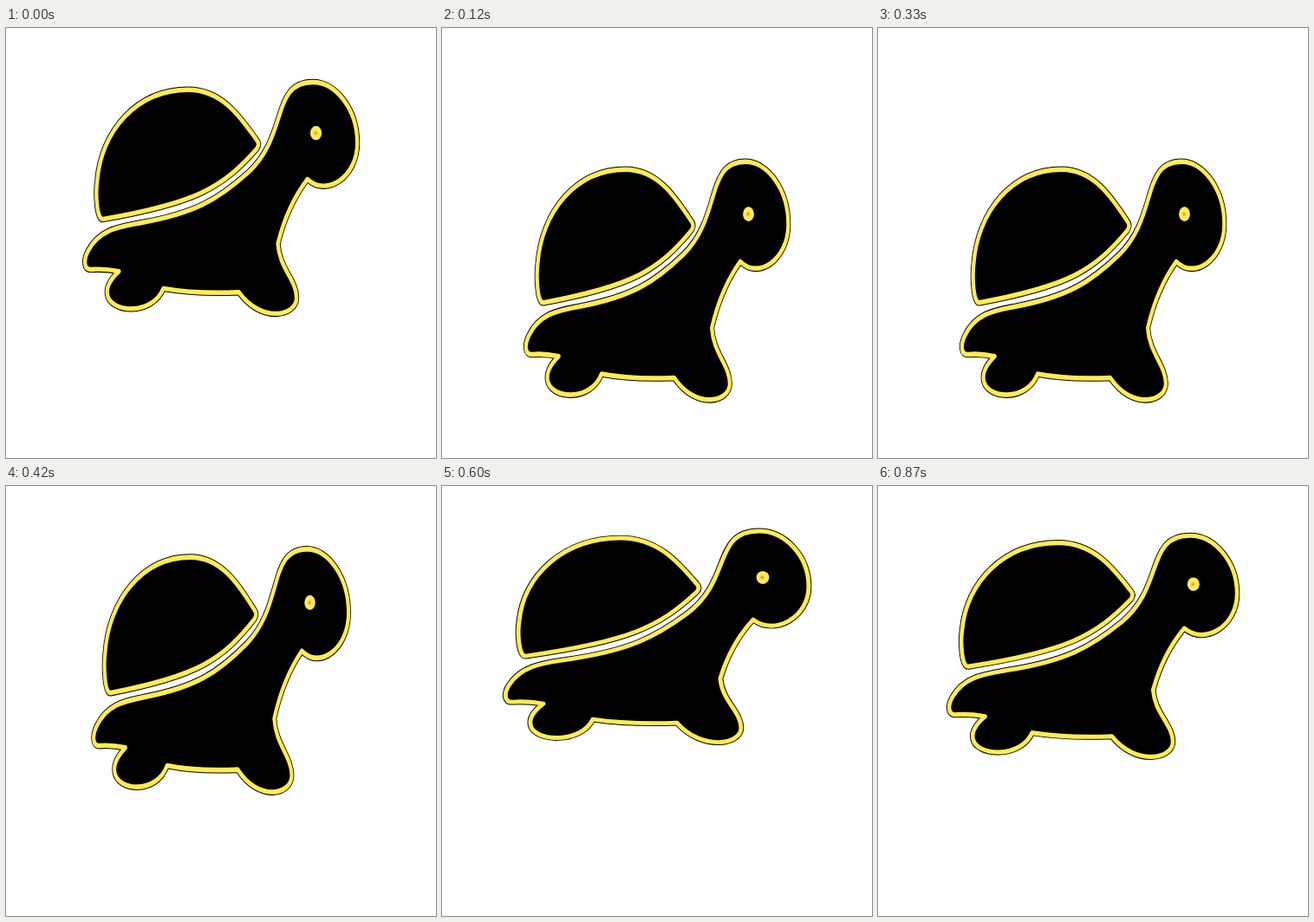
An HTML page with a canvas that plays this animation: 496 px wide and 496 px high, repeating every 900 ms.

```html
<!DOCTYPE html>
<html lang="en">
<head>
<meta charset="utf-8">
<title>Bouncing turtle</title>
<style>
  html, body { margin: 0; width: 100%; height: 100%; overflow: hidden; background: #fff; }
  canvas { display: block; }
</style>
</head>
<body>
<canvas id="stage" width="496" height="496"></canvas>
<script>
const ctx = document.getElementById('stage').getContext('2d');
const SIZE = 496, STEP = 30, STEPS = 30, LANDING = 7.5;
const YELLOW = '#ffec55';
const REST = { x: 248, y: 174, width: 356, height: 250 };

const shell = new Path2D(`M97 196 C88 198 87 168 89 156 C94 104 139 60 206 60
  C250 60 274 90 294 113 Q298 117 294 122 C250 163 216 179 97 196Z`);

const body = new Path2D(`M117 251 Q98 248 82 249 C72 250 71 240 77 230
  C92 206 120 204 145 200 C215 190 245 175 283 147 C335 108 312 52 366 52
  C395 52 423 80 423 116 S383 173 359 154 Q333 182 321 222
  C323 248 345 260 345 279 S300 306 271 273 Q215 275 174 269
  C160 298 105 295 102 275 Q100 264 117 251Z`);

// Stretches while falling or rising, squashes near the landing
function poseAt(tick) {
  const angle = 2 * Math.PI * (tick - LANDING) / STEPS;
  const drop = Math.cos(angle / 2) ** 6;
  const squash = Math.max(0, Math.cos(angle)) ** 1.5;
  const stretch = drop * (1 - 1.17 * squash);
  return {
    y: REST.y + 178 * drop,
    scaleX: 1 - 290 * stretch / REST.width,
    scaleY: 1 + 192 * stretch / REST.height
  };
}

function outline(path, width, color) {
  ctx.lineWidth = width;
  ctx.strokeStyle = color;
  ctx.stroke(path);
}

function drawPart(path) {
  ctx.fillStyle = '#000';
  ctx.fill(path);
  outline(path, 6.8, '#000');
  outline(path, 4.9, YELLOW);
}

function drawDot(x, y, radius, color) {
  ctx.fillStyle = color;
  ctx.beginPath();
  ctx.arc(x, y, radius, 0, Math.PI * 2);
  ctx.fill();
}

function draw(time) {
  const { y, scaleX, scaleY } = poseAt(Math.floor(time / STEP) % STEPS);
  ctx.resetTransform();
  ctx.fillStyle = '#fff';
  ctx.fillRect(0, 0, SIZE, SIZE);
  ctx.translate(REST.x, y);
  ctx.scale(scaleX, scaleY);
  ctx.translate(-REST.x, -REST.y);
  ctx.lineJoin = 'round';
  drawPart(shell);
  drawPart(body);
  drawDot(370, 105.5, 7.4, YELLOW);
  drawDot(369.5, 105.5, 2.2, '#d8b04c');
}

let start;
function loop(now) {
  start ??= now;
  draw(now - start);
  requestAnimationFrame(loop);
}
draw(0);
requestAnimationFrame(loop);
</script>
</body>
</html>
```
